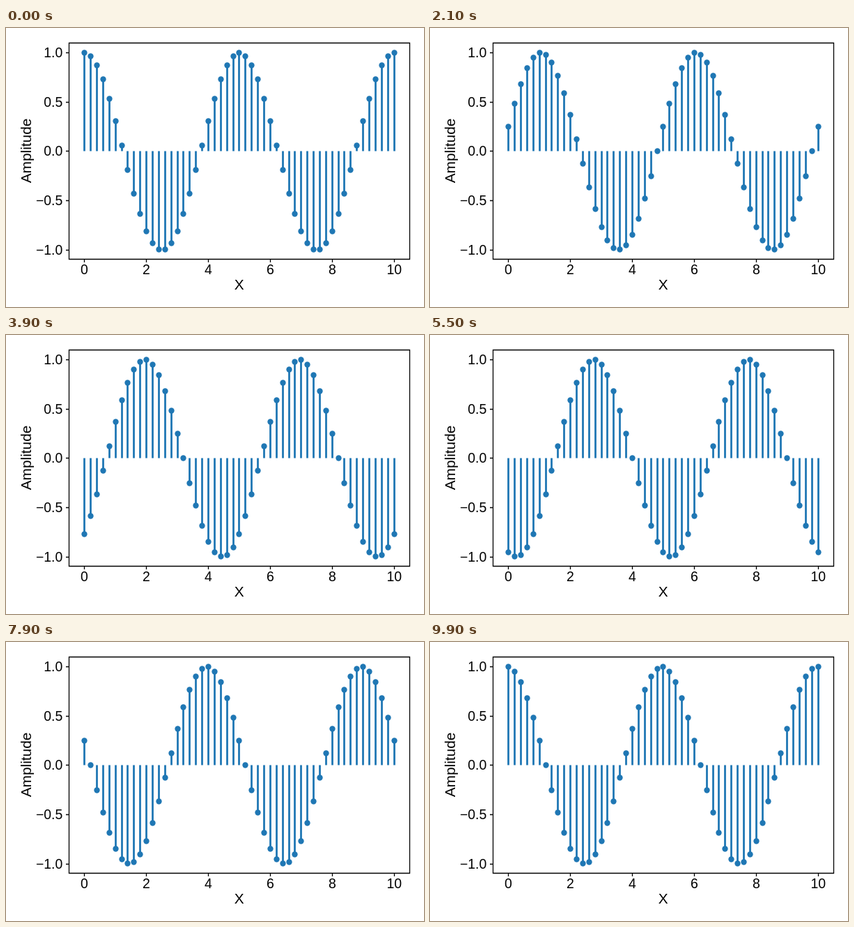
Recreate the animation shown at these times as an HTML page. Size 600 by 400 pixels, loop 10 s.

```html
<!DOCTYPE html>
<html lang="en">
<head>
<meta charset="utf-8">
<title>Travelling wave stem plot</title>
<style>
  html, body { margin: 0; width: 100%; height: 100%; overflow: hidden; background: #fff; }
  svg { display: block; width: 600px; height: 400px; }
  text { font-family: "Liberation Sans", Arial, sans-serif; font-size: 19.44px; fill: #000; }
  .title { font-size: 20.83px; }
  .mid { text-anchor: middle; }
  .end { text-anchor: end; }
  .axes { fill: none; stroke: #000; stroke-width: 1.3; }
  .stems { fill: none; stroke: #1f77b4; stroke-width: 2.78; }
  .dots { fill: #1f77b4; }
</style>
</head>
<body>
<svg id="plot" viewBox="0 0 600 400">
  <text class="title mid" x="334.8" y="375">X</text>
  <text class="title mid" transform="translate(35.5 176) rotate(-90)">Amplitude</text>
</svg>
<script>
const plot = document.getElementById("plot");
const LOOP = 10000, STEP = 100, PERIOD = 5, COUNT = 51, TICK = 4.5;

// Data to pixel coordinates, snapped to pixel centres
const snap = v => Math.floor(v + 0.5) + 0.5;
const px = x => snap(112.2 + 44.44 * x);
const py = y => snap(176.45 - 141.25 * y);

function add(tag, attrs, text = "") {
  const el = document.createElementNS("http://www.w3.org/2000/svg", tag);
  for (const key in attrs) el.setAttribute(key, attrs[key]);
  el.textContent = text;
  return plot.appendChild(el);
}

const stems = add("path", { class: "stems" });
const dots = Array.from({ length: COUNT }, (_, i) =>
  add("circle", { class: "dots", cx: px(i / 5), r: 4.17 }));

let axes = "M90.5 21.5H579.5V331.5H90.5Z";
for (let x = 0; x <= 10; x += 2) {
  axes += `M${px(x)} 331.5v${TICK}`;
  add("text", { class: "mid", x: px(x) - 0.2, y: 353 }, x);
}
for (let y = -1; y <= 1; y += 0.5) {
  axes += `M90.5 ${py(y)}h${-TICK}`;
  add("text", { class: "end", x: 81.3, y: py(y) + 6.5 }, y.toFixed(1).replace("-", "\u2212"));
}
add("path", { class: "axes", d: axes });

function draw() {
  const time = performance.now() % LOOP;
  const phase = Math.floor(time / STEP) * STEP / LOOP;
  let path = "";
  dots.forEach((dot, i) => {
    const x = i / 5;
    const y = py(Math.cos(2 * Math.PI * (x / PERIOD - phase)));
    dot.setAttribute("cy", y);
    path += `M${px(x)} ${py(0)}V${y}`;
  });
  stems.setAttribute("d", path);
  requestAnimationFrame(draw);
}
draw();
</script>
</body>
</html>
```
